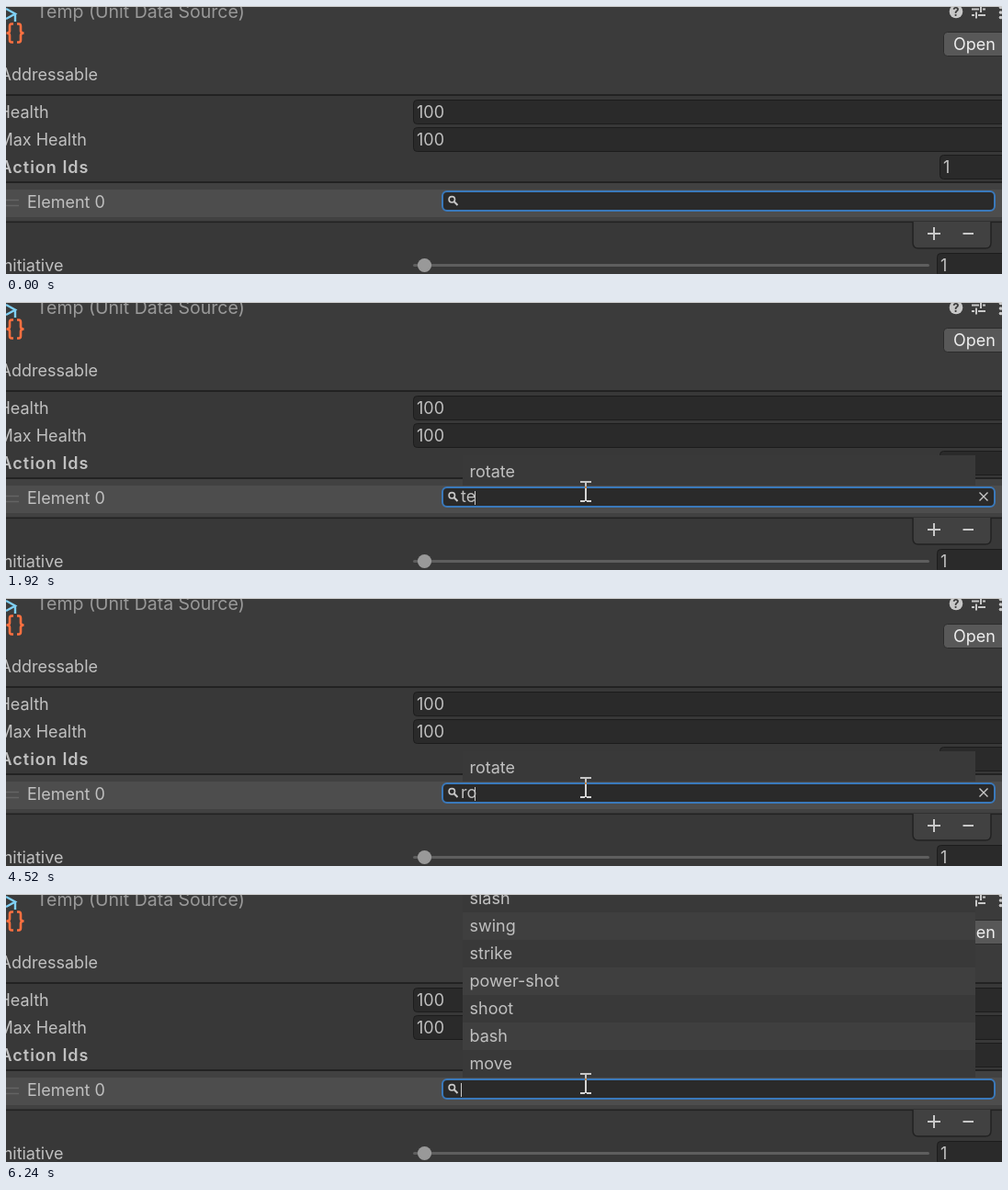
Recreate the animation shown at these times as an HTML page. Size 1084 px wide and 292 px high, loop 8 s.

```html
<!DOCTYPE html>
<html lang="en">
<head>
<meta charset="utf-8">
<title>Inspector search field</title>
<style>
html, body { margin: 0; width: 100%; height: 100%; overflow: hidden; background: #383838; }
svg { display: block; width: 1084px; height: 292px; isolation: isolate; }
text { font: 18px Inter, Roboto, sans-serif; font-optical-sizing: none; fill: #c0c0c0; white-space: pre; }
.end { text-anchor: end; }
.title { font-size: 19.5px; fill: #999; }
.bold { font-weight: 600; letter-spacing: 1px; }
.field { fill: #2a2a2a; stroke: #1c1c1c; }
.line { fill: none; stroke: #c8c8c8; stroke-width: 2; }
.rule { fill: #222; }
#beam { mix-blend-mode: difference; fill: none; stroke: #fff; stroke-width: 2; }
</style>
</head>
<body>
<svg viewBox="0 0 1084 292">
  <rect width="1084" height="292" fill="#383838"/>
  <rect width="1084" height="97" fill="#3b3b3b"/>
  <rect class="rule" y="96" width="1084" height="2" fill="#1a1a1a"/>

  <!-- header -->
  <g fill="none" stroke="#7fd0f5" stroke-width="2.4">
    <path d="M0 3L10 8.5L0 14M10 8V17"/>
    <g stroke="#ff7040" stroke-width="2.6">
      <path id="brace" d="M8 19.5H6Q4 19.5 4 22V27Q4 29.5 0.5 29.5Q4 29.5 4 32V37Q4 39.5 6 39.5H8"/>
      <use href="#brace" transform="translate(20 0) scale(-1 1)"/>
    </g>
  </g>
  <text class="title" x="33" y="13">Temp (Unit Data Source)</text>
  <circle cx="1034" cy="6" r="7.3" fill="#c8c8c8"/>
  <text x="1034" y="11" style="font-size:13px;font-weight:700;fill:#3b3b3b;text-anchor:middle">?</text>
  <path class="line" d="M1051 3.5H1059M1063 3.5H1066M1061 0V7M1051 10H1054M1058 10H1066M1056 6.5V13.5"/>
  <g fill="#c8c8c8">
    <circle cx="1082.5" cy="1.5" r="1.8"/><circle cx="1082.5" cy="7" r="1.8"/><circle cx="1082.5" cy="12.5" r="1.8"/>
  </g>
  <rect x="1020.5" y="28.5" width="80" height="26" rx="4" fill="#585858" stroke="#2c2c2c"/>
  <text x="1031" y="48" style="fill:#eee">Open</text>
  <text class="end" x="100" y="81">Addressable</text>

  <!-- properties -->
  <text class="end" x="46.7" y="122">Health</text>
  <text class="end" x="88" y="152">Max Health</text>
  <text class="end bold" x="90.5" y="182">Action Ids</text>
  <rect class="field" x="443.5" y="102.5" width="660" height="26" rx="4"/>
  <rect class="field" x="443.5" y="132.5" width="660" height="26" rx="4"/>
  <rect class="field" x="1016.5" y="162.5" width="90" height="26" rx="4"/>
  <text x="447" y="122">100</text>
  <text x="447" y="152">100</text>
  <text x="1020" y="182">1</text>

  <!-- list -->
  <rect y="192" width="1084" height="44" fill="#414141"/>
  <rect y="200" width="1084" height="30" fill="#4d4d4d"/>
  <rect class="rule" y="191" width="1084" height="2"/>
  <rect class="rule" y="234.5" width="1084" height="1.6"/>
  <path d="M987 235V258Q987 264 993 264H1066Q1072 264 1072 258V235" fill="#414141" stroke="#222" stroke-width="1.5"/>
  <path class="line" d="M1003 248H1017M1010 241V255M1041.5 248H1053"/>
  <path d="M0 211.5H14M0 217.5H14" stroke="#646464" stroke-width="1.4"/>
  <text x="23" y="220">Element 0</text>

  <!-- slider -->
  <text class="end" x="62.5" y="289">Initiative</text>
  <rect x="443" y="281" width="562" height="3" rx="1.5" fill="#5e5e5e"/>
  <circle cx="455.5" cy="282.5" r="7.6" fill="#999"/>
  <rect class="field" x="1013.5" y="269.5" width="90" height="26" rx="4"/>
  <text x="1017" y="289">1</text>

  <g id="popup"></g>

  <!-- search field -->
  <rect x="475" y="202" width="601" height="21" rx="5" fill="#2a2a2a" stroke="#3a79bb" stroke-width="2"/>
  <g class="line">
    <circle cx="485.3" cy="210.8" r="3.2" style="stroke-width:1.6"/>
    <path d="M487.8 213.3L491.5 217"/>
  </g>
  <text id="query" x="495" y="218"></text>
  <rect id="caret" y="206" width="1" height="15" fill="#ccc"/>
  <path id="clear" class="line" style="stroke-width:1.4" d="M1059.5 207.5L1068.5 216.5M1068.5 207.5L1059.5 216.5"/>

  <rect width="1084" height="1" fill="#cfcfcf"/>
  <path id="arrow" d="M0 0V23L5.4 18L9 26.5L12.8 25L9.2 16.7H16.5Z" fill="#fff" stroke="#000" stroke-width="1.2"/>
  <path id="beam" d="M-6 -10H-1M1 -10H6M0 -11V11M-6 11H-1M1 11H6"/>
</svg>
<script>
const LOOP = 8000, STEP = 40, BOTTOM = 200, ROW = 30;
const $ = id => document.getElementById(id);

const lists = {
  all: ['slash', 'swing', 'strike', 'power-shot', 'shoot', 'bash', 'move'],
  t: ['rotate', 'vault', 'strike', 'power-shot', 'shoot', 'tactical-advance'],
  r: ['rotate', 'charge', 'parry', 'strike', 'power-shot'],
  one: ['rotate']
};

// start, query, caret x, list, highlighted
const states = [
  [0, '', null],
  [720, '', 495],
  [1720, 't', 499, 't'],
  [1920, 'te', 510, 'one'],
  [3200, 't', 499, 't'],
  [3960, '', 495, 'all'],
  [4360, 'r', 501, 'r'],
  [4520, 'ro', 510, 'one'],
  [5440, 'ro', 510, 'one', true],
  [6120, 'r', 501, 'r'],
  [6240, '', 495, 'all']
];

// time, x, y of the pointer
const path = [
  [200, 817, 274], [280, 752, 251], [360, 680, 222], [440, 638, 206],
  [480, 631, 211], [960, 631, 211], [1040, 631, 208], [1120, 631, 206]
];

const rect = (x, y, w, h, fill) =>
  `<rect x="${x}" y="${y}" width="${w}" height="${h}" fill="${fill}"/>`;

function popupMarkup(list, lit) {
  if (!list) return '';
  const names = lists[list], top = BOTTOM - names.length * ROW;
  let out = rect(497, top - 3, 558, BOTTOM - top + 3, '#393939');
  names.forEach((name, i) => {
    const y = top + i * ROW, odd = (names.length - i) % 2;
    if (lit) out += rect(500, y, 552, ROW, '#2c5d87');
    else if (!odd) out += rect(497, y, 558, ROW, '#3f3f3f');
    out += `<text x="504.5" y="${y + 21}">${name}</text>`;
  });
  return out;
}

function pointerAt(t) {
  const i = path.findIndex(p => p[0] > t);
  if (i < 0) return path[path.length - 1].slice(1);
  const [t0, x0, y0] = path[i - 1], [t1, x1, y1] = path[i];
  const k = (t - t0) / (t1 - t0);
  return [x0 + (x1 - x0) * k, y0 + (y1 - y0) * k];
}

const show = (el, on) => { el.style.display = on ? '' : 'none'; };
let current;

function setState(state) {
  if (state === current) return;
  current = state;
  const [, query, caret, list, lit] = state;
  $('popup').innerHTML = popupMarkup(list, lit);
  $('query').textContent = query;
  show($('caret'), caret !== null);
  $('caret').setAttribute('x', caret || 0);
  show($('clear'), query);
}

function draw(t) {
  setState(states.filter(s => s[0] <= t).pop());
  const seen = t >= path[0][0];
  const [x, y] = seen ? pointerAt(Math.floor(t / STEP) * STEP) : [0, 0];
  const typing = y < 224;
  show($('arrow'), seen && !typing);
  show($('beam'), seen && typing);
  $(typing ? 'beam' : 'arrow').setAttribute('transform', `translate(${x} ${y})`);
}

const start = performance.now();
function tick() {
  draw((performance.now() - start) % LOOP);
  requestAnimationFrame(tick);
}
tick();
</script>
</body>
</html>
```
